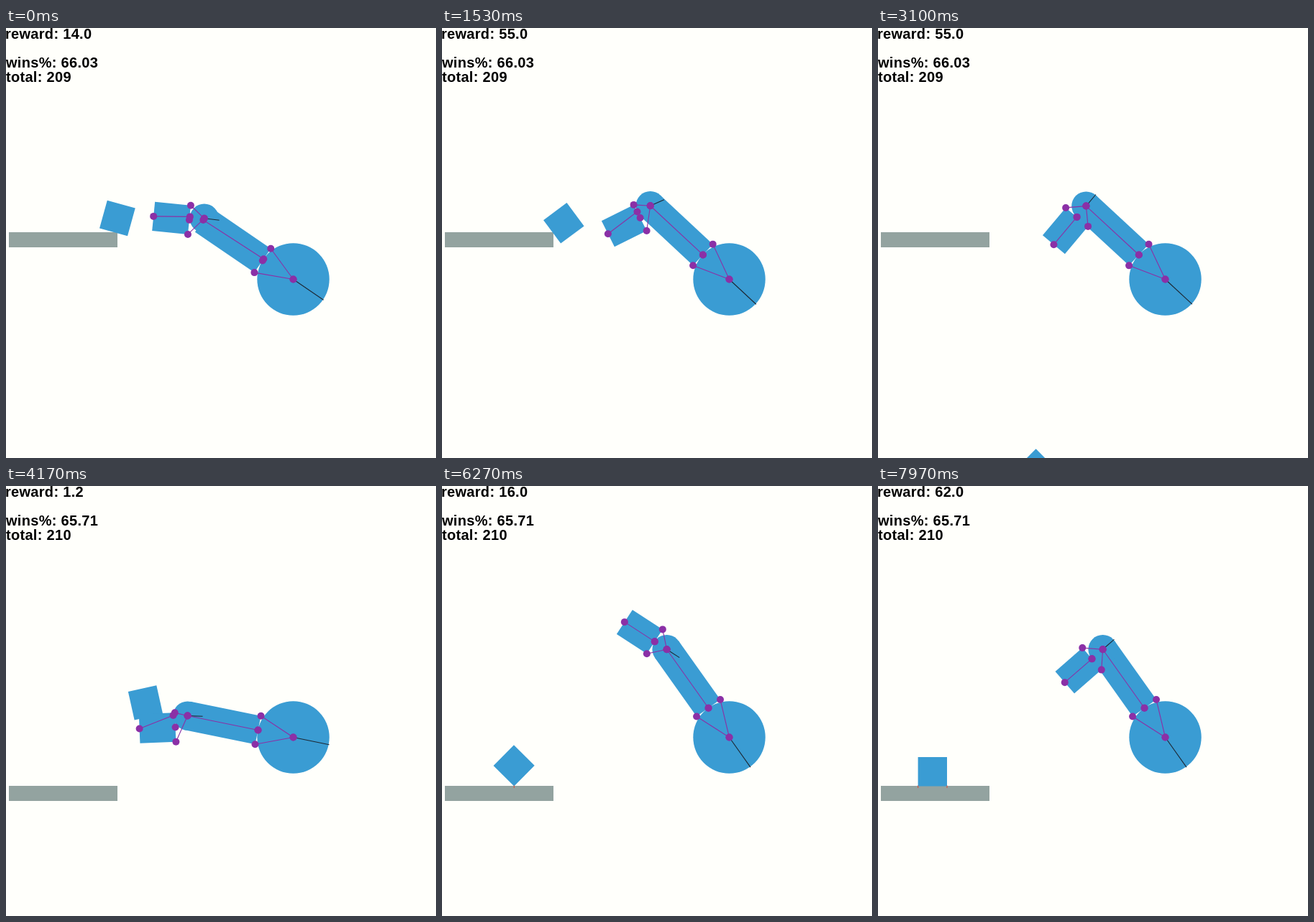
An HTML page with a canvas for the animation above (8 s loop, 598 by 598 pixels).

```html
<!DOCTYPE html>
<html lang="en">
<head>
<meta charset="utf-8">
<title>Throwing arm</title>
<style>
  html, body { margin: 0; width: 100%; height: 100%; overflow: hidden; background: #fffffb; }
  canvas { display: block; }
</style>
</head>
<body>
<canvas id="stage" width="598" height="598"></canvas>
<script>
const ctx = document.getElementById('stage').getContext('2d');
const BLUE = '#3a9cd3', GREY = '#93a3a0', PURPLE = '#8b30a6', DARK = '#1d2733', RED = '#d8503f';
const LOOP = 8000, STEP = 37;
const SHOULDER = [399, 349], BOX_HALF = 20.2, HALF_GRAVITY = 1.14e-4;

// Times of the events, in ms
const TIPPED = 1530, RESET = 3430, CAUGHT = 3730, THROWN = 4170, SCORED = 4450,
  SWING = 5070, SWUNG = 5800, LANDED = 5890, SETTLED = 6570;

const mix = (a, b, u) => a + (b - a) * u;
const ramp = (t, from, to) => Math.min(1, Math.max(0, (t - from) / (to - from)));
const ease = (t, from, to) => {
  const u = ramp(t, from, to);
  return u * u * (3 - 2 * u);
};
const pulse = (t, from, to) => Math.sin(Math.PI * ramp(t, from, to));
const radians = degrees => degrees * Math.PI / 180;

function flight(x, y, angle, vx, vy, spin, time) {
  return {
    x: x + vx * time,
    y: y + vy * time + HALF_GRAVITY * time * time,
    angle: angle + spin * time
  };
}

// The box tips over the platform edge and falls past the arm.
const miss = {
  platformY: 284, wins: '66.03', total: 209,
  reward: t => Math.min(55, 14 + Math.floor(t / STEP)),
  arm(t) {
    const hand = mix(5.7, -50, ramp(t, 0, 2650));
    return {
      shoulder: mix(34.4, 42.8, ease(t, 400, 1600)) - 2.5 * pulse(t, 0, 800) + 2 * pulse(t, 1500, 2300),
      slip: 3 * (1 - ramp(t, 0, 400)),
      hand,
      lag: hand - mix(-5.7, -50, ease(t, 0, 1600))
    };
  },
  box(t) {
    if (t > TIPPED) return flight(168.8, 270.8, 53.4, 0.032, 0.039, 0.052, t - TIPPED);
    const u = t / TIPPED;
    return {
      x: mix(154.4, 168.8, u * u),
      y: mix(264, 270.8, u * u),
      angle: 15.4 * Math.exp(1.243 * u)
    };
  }
};

// The arm throws the box onto the platform, where it rolls once.
const hit = {
  platformY: 417, wins: '65.71', total: 210,
  reward(t) {
    const steps = from => Math.max(0, Math.floor((t - from) / STEP));
    return t < SCORED ? steps(CAUGHT - 10) / 10 : 5 + steps(LANDED - 30);
  },
  arm(t) {
    const lifted = -2.3 + 10.8 * ease(t, THROWN, SWING) + 61.5 * ease(t, SWING, SWUNG);
    return {
      shoulder: 54.6 * ramp(t, 3680, 6010),
      slip: 0,
      hand: t < SWUNG ? lifted : mix(-41, 70, (1 - ramp(t, SWUNG, 7970)) ** 1.66),
      lag: 41 * ease(t, RESET, THROWN) * (1 - ramp(t, THROWN, 6080))
    };
  },
  box(t) {
    if (t < THROWN) {
      const carried = ramp(t, CAUGHT, THROWN) ** 2;
      return {
        x: 200 - 6.5 * carried,
        y: 299 + 10 * ramp(t, RESET, CAUGHT) ** 2 - 8 * carried ** 2,
        angle: -12.5 * carried
      };
    }
    const thrown = time => flight(193.5, 301, -12.5, -0.0405, -0.143, -0.0383, time - THROWN);
    if (t < LANDED) return thrown(t);
    const contact = thrown(LANDED), u = ramp(t, LANDED, SETTLED);
    const angle = mix(contact.angle, -180, u), a = radians(angle);
    return {
      x: mix(contact.x, 75.3, u ** 1.2),
      y: this.platformY - BOX_HALF * (Math.abs(Math.cos(a)) + Math.abs(Math.sin(a))),
      angle,
      grounded: true
    };
  }
};

// Point at a distance along an angle, with an optional sideways shift.
function offset([x, y], degrees, along, side = 0) {
  const c = Math.cos(radians(degrees)), s = Math.sin(radians(degrees));
  return [x + along * c - side * s, y + along * s + side * c];
}

function polygon(points) {
  ctx.fillStyle = BLUE;
  ctx.beginPath();
  points.forEach(p => ctx.lineTo(...p));
  ctx.fill();
}

function disc([x, y], radius, color) {
  ctx.fillStyle = color;
  ctx.beginPath();
  ctx.arc(x, y, radius, 0, 2 * Math.PI);
  ctx.fill();
}

function line(p, q, color) {
  ctx.strokeStyle = color;
  ctx.lineWidth = 1.1;
  ctx.beginPath();
  ctx.moveTo(...p);
  ctx.lineTo(...q);
  ctx.stroke();
}

function wheel(center, radius, angle) {
  disc(center, radius + 0.2, BLUE);
  line(center, offset(center, angle, radius + 1), DARK);
}

// Limb extending backwards from its near end; returns its joint points.
function limb(near, angle, length) {
  const corners = [-BOX_HALF, BOX_HALF].map(side => offset(near, angle, 0, side));
  const far = offset(near, angle, -length);
  polygon([...corners, offset(far, angle, 0, BOX_HALF), offset(far, angle, 0, -BOX_HALF)]);
  return { near, corners, far };
}

function joint(p, q) {
  line(p, q, PURPLE);
  disc(p, 5, PURPLE);
  disc(q, 5, PURPLE);
}

function drawArm({ shoulder, slip, hand, lag }) {
  const elbow = offset(SHOULDER, shoulder, -150);
  const elbowAngle = hand + lag * 0.1;
  const wrist = offset(elbow, hand - lag, -20 - Math.abs(lag) * 0.08);
  const upper = limb(offset(SHOULDER, shoulder - slip, -50), shoulder, 100);
  const lower = limb(wrist, hand, 50);
  wheel(SHOULDER, 50, shoulder);
  wheel(elbow, 20, elbowAngle);

  upper.corners.forEach(p => joint(SHOULDER, p));
  joint(upper.far, offset(SHOULDER, shoulder, -50));
  disc(upper.near, 5, PURPLE);
  lower.corners.forEach(p => joint(elbow, p));
  joint(lower.far, offset(elbow, elbowAngle, -20));
  disc(lower.near, 5, PURPLE);
}

function drawBox({ x, y, angle, grounded }, floor) {
  const corners = [0, 1, 2, 3].map(i => offset([x, y], angle + 90 * i, BOX_HALF, BOX_HALF));
  polygon(corners);
  if (!grounded) return;
  corners.filter(p => p[1] > floor - 1.5)
    .forEach(p => line([p[0], floor - 1], [p[0], floor + 2.5], RED));
}

function draw(t) {
  const scene = t < RESET ? miss : hit;
  ctx.fillStyle = '#fffffb';
  ctx.fillRect(0, 0, 598, 598);
  ctx.fillStyle = GREY;
  ctx.fillRect(4, scene.platformY, 151, 21);

  // Shapes are centred on pixels.
  ctx.save();
  ctx.translate(0.5, 0.5);
  drawBox(scene.box(t), scene.platformY);
  drawArm(scene.arm(t));
  ctx.restore();

  ctx.fillStyle = '#000';
  ctx.font = 'bold 20px "Liberation Sans", Arial, sans-serif';
  ctx.letterSpacing = '0.3px';
  ctx.fillText('reward: ' + scene.reward(t).toFixed(1), -1, 15);
  ctx.fillText('wins%: ' + scene.wins, 0, 55);
  ctx.fillText('total: ' + scene.total, 0, 75);
}

const start = performance.now();
function tick() {
  draw((performance.now() - start) % LOOP);
  requestAnimationFrame(tick);
}
tick();
</script>
</body>
</html>
```
